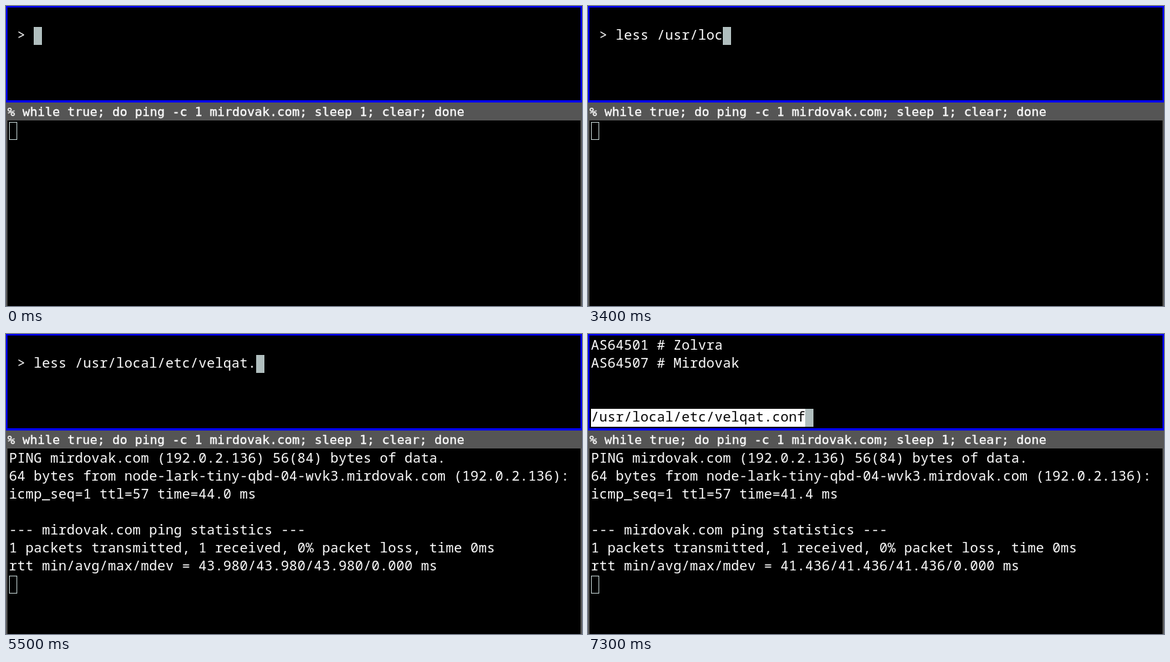
Recreate the animation shown at these times as an HTML page. Size 769 px wide and 401 px high, loop 8 s.

```html
<!DOCTYPE html>
<html lang="en">
<head>
<meta charset="utf-8">
<title>Terminals</title>
<style>
  html, body { margin: 0; width: 100%; height: 100%; overflow: hidden; background: #000; }
  svg { display: block; width: 769px; height: 401px; }
  text { white-space: pre; }
  .term { font: 18px "Noto Sans Mono", monospace; fill: #fff; }
  .bar { font: 16.6px "DejaVu Sans Mono", monospace; fill: #fff; stroke: #fff; stroke-width: .3; }
</style>
</head>
<body>
<svg id="stage" viewBox="0 0 769 401" xmlns="http://www.w3.org/2000/svg">
  <rect width="769" height="401" fill="#000"/>
  <rect width="769" height="129" fill="#00f"/>
  <rect x="2" y="2" width="765" height="124" fill="#000"/>
  <rect y="129" width="769" height="272" fill="#555"/>
  <rect x="2" y="153" width="765" height="248" fill="#000"/>
  <rect id="status" x="4" y="100" height="24" fill="#fff"/>
  <rect id="cursor" width="11" height="24" fill="#b0bebe"/>
  <rect id="hollow" x="4.5" width="10" height="23" fill="none" stroke="#b0bebe"/>
</svg>
<script>
const LOOP = 8000, TICK = 100, PAGER_AT = 7300;
const CELL = 11, ROW = 24, LEFT = 4, TOP = 4, LOW = 155, BASE = 17;
const HOST = "mirdovak.com", IP = "192.0.2.136";
const FILE = "/usr/local/etc/velqat.conf";
const COMMAND = `less ${FILE} `;

// Typing rhythm, one mark per tick: "_" waits, ">" completes with Tab, the rest are keys.
const KEYS = "__le_ss__ ____/_____us_r___/____local__/_e_t_c_/___v_e_>_______c_>";

// Each ping cycle starts with a reply, is cleared a second later, then asks again.
const FIRST_REPLY = 80, CYCLE = 1157, CLEAR = 1000, REQUEST = 1055;
const TRIPS = [40.512, 42.108, 39.884, 39.267, 43.98, 40.731, 41.436];

const el = id => document.getElementById(id);
const stage = el("stage"), status = el("status"), cursor = el("cursor"), hollow = el("hollow");

function addLine(cls, y) {
  const node = document.createElementNS(stage.namespaceURI, "text");
  node.setAttribute("class", cls);
  node.setAttribute("y", y);
  stage.appendChild(node);
  return node;
}

// Put every character on its own grid cell.
function write(node, str, left = LEFT, step = CELL) {
  if (node.textContent === str) return;
  node.setAttribute("x", Array.from(str, (c, i) => left + i * step).join(" "));
  node.textContent = str;
}

const rows = (count, top) =>
  Array.from({ length: count }, (_, i) => addLine("term", top + i * ROW + BASE));

const upper = rows(5, TOP), lower = rows(7, LOW);
upper[4].style.fill = "#000";
write(addLine("bar", 147),
  `% while true; do ping -c 1 ${HOST}; sleep 1; clear; done`, 2, 10);

function typed(t) {
  let text = "";
  for (const key of KEYS.slice(0, t / TICK + 1)) {
    if (key === ">") text += COMMAND.slice(text.length).match(/^[^. ]*[. ]/)[0];
    else if (key !== "_") text += key;
  }
  return text;
}

function pingLines(t) {
  const cycle = Math.floor((t - FIRST_REPLY) / CYCLE);
  const phase = t - FIRST_REPLY - cycle * CYCLE;
  if (t === 0 || (phase >= CLEAR && phase < REQUEST)) return [];

  const request = `PING ${HOST} (${IP}) 56(84) bytes of data.`;
  if (phase >= REQUEST) return [request];

  const trip = TRIPS[cycle], r = trip.toFixed(3);
  return [
    request,
    `64 bytes from node-lark-tiny-qbd-04-wvk3.${HOST} (${IP}):`,
    `icmp_seq=1 ttl=57 time=${trip.toFixed(1)} ms`,
    "",
    `--- ${HOST} ping statistics ---`,
    "1 packets transmitted, 1 received, 0% packet loss, time 0ms",
    `rtt min/avg/max/mdev = ${r}/${r}/${r}/0.000 ms`
  ];
}

function draw(t) {
  const paging = t >= PAGER_AT;
  const top = paging
    ? ["AS64501 # Zolvra", "AS64507 # Mirdovak", "", "", FILE]
    : ["", " > " + typed(t)];
  upper.forEach((node, i) => write(node, top[i] || ""));

  const at = top.length - 1;
  cursor.setAttribute("x", LEFT + top[at].length * CELL);
  cursor.setAttribute("y", TOP + at * ROW);
  status.setAttribute("width", paging ? FILE.length * CELL : 0);

  const out = pingLines(t);
  lower.forEach((node, i) => write(node, out[i] || ""));
  hollow.setAttribute("y", LOW + out.length * ROW + 0.5);
}

function tick() {
  const t = performance.now() % LOOP;
  draw(Math.floor(t / TICK) * TICK);
  requestAnimationFrame(tick);
}
tick();
</script>
</body>
</html>
```
